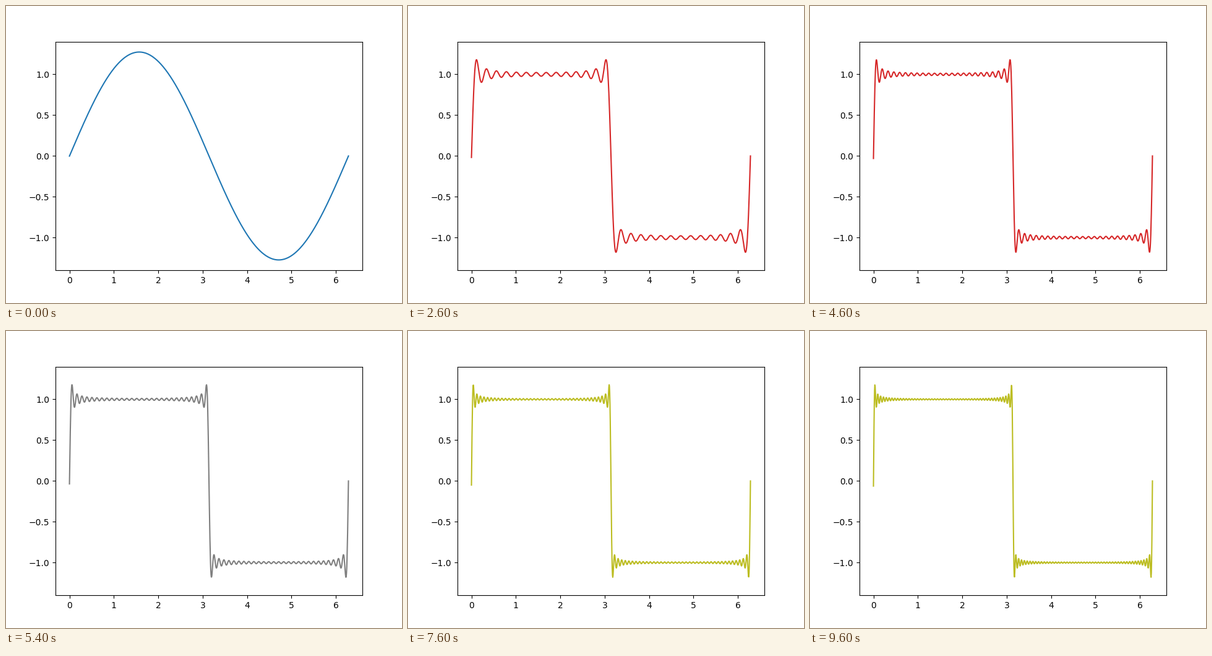
Animation of 640 by 480 pixels, one loop 9.8 s. Source, as a matplotlib script:

```python
import numpy as np
import matplotlib.pyplot as plt
from matplotlib.animation import FuncAnimation

FRAMES = 49
INTERVAL = 200  # ms

x = np.linspace(-0.001, 2 * np.pi, 1000)


def square_wave(terms):
    """Partial Fourier sum of a unit square wave."""
    odd = 2 * np.arange(terms)[:, None] + 1
    return 4 / np.pi * (np.sin(odd * x) / odd).sum(axis=0)


fig, ax = plt.subplots(figsize=(6.4, 4.8), dpi=100)
line, = ax.plot(x, square_wave(1), color="C0")

# Keep the limits fitted to the first harmonic.
ax.set_xlim(ax.get_xlim())
ax.set_ylim(ax.get_ylim())


def update(i):
    line.set_ydata(square_wave(i + 1))
    line.set_color(f"C{i % 10}")
    return line,


anim = FuncAnimation(fig, update, frames=FRAMES, interval=INTERVAL,
                     repeat=True, repeat_delay=0)
plt.show()
```
